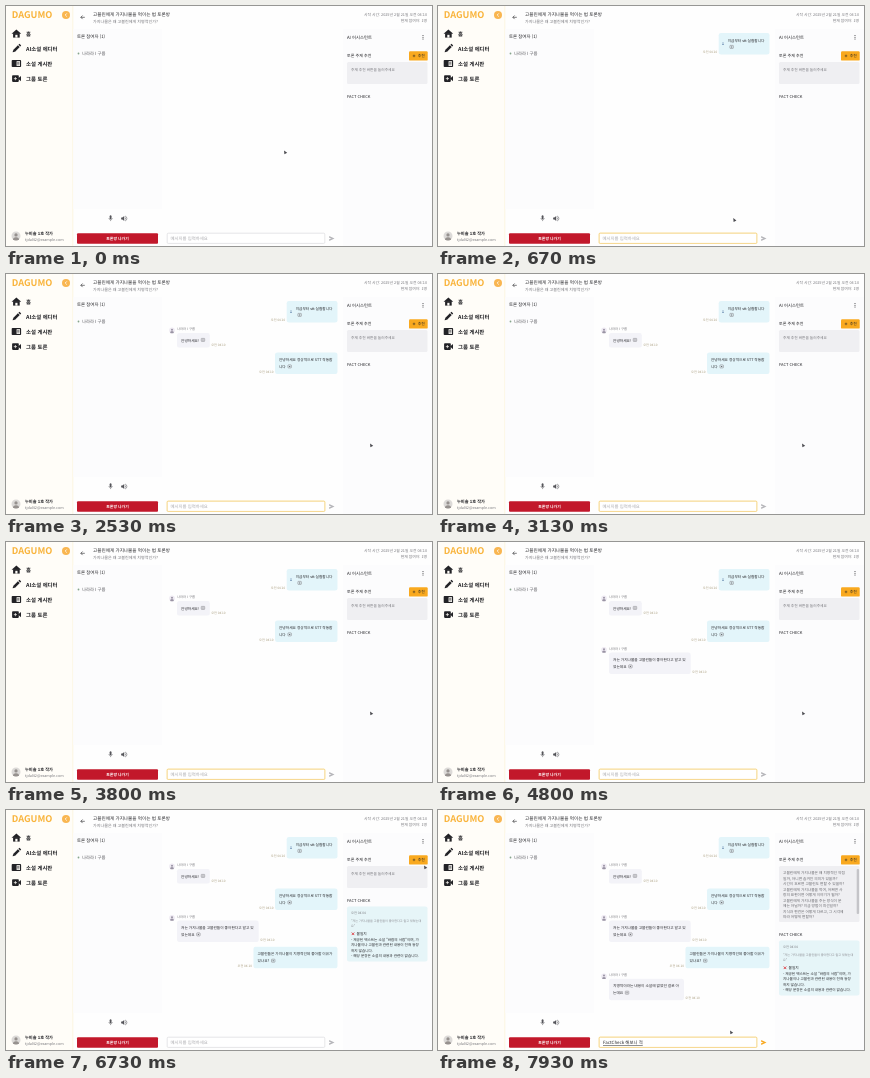
Write an HTML page with a canvas that moves like this. It is 426 px wide and 240 px high and loops after 8000 ms.

```html
<!DOCTYPE html>
<html lang="ko">
<head>
<meta charset="utf-8">
<title>토론방</title>
<style>
html, body { margin: 0; width: 100%; height: 100%; overflow: hidden; background: #fff; }
canvas { display: block; width: 100vw; height: 100vh; }
</style>
</head>
<body>
<canvas id="stage"></canvas>
<script>
const W = 426, H = 240, LOOP = 8000;
const FONT = '"Noto Sans CJK KR", "Noto Sans CJK", "Noto Sans", sans-serif';
const INK = '#222226', GREY = '#77777c', PALE = '#a9a9ad', ORANGE = '#f9a91f';
const SIDE = '#fffdf8', PANEL = '#fcfcfd';
const USER = '나라라 I 구름';
const canvas = document.getElementById('stage');
const ctx = canvas.getContext('2d');

function setFont(size, weight = 400) {
  ctx.font = `${weight} ${size}px ${FONT}`;
}

function text(str, x, y, size, color = INK, weight = 400, align = 'left') {
  setFont(size, weight);
  ctx.fillStyle = color;
  ctx.textAlign = align;
  ctx.fillText(str, x, y);
}

function lines(list, x, y, step, size, color) {
  list.forEach((str, i) => text(str, x, y + i * step, size, color));
}

function box(x, y, w, h, fill, r = 0, stroke) {
  ctx.beginPath();
  ctx.roundRect(x, y, w, h, r);
  if (fill) { ctx.fillStyle = fill; ctx.fill(); }
  if (stroke) { ctx.strokeStyle = stroke; ctx.lineWidth = 0.6; ctx.stroke(); }
}

function disc(x, y, r, fill) {
  ctx.beginPath();
  ctx.arc(x, y, r, 0, Math.PI * 2);
  ctx.fillStyle = fill;
  ctx.fill();
}

// Triangle with its tip at x, y, pointing along the angle
function wedge(x, y, length, half, angle, fill) {
  at(x, y, () => {
    ctx.rotate(angle);
    ctx.beginPath();
    ctx.moveTo(0, 0);
    ctx.lineTo(-length, half);
    ctx.lineTo(-length, -half);
    ctx.fillStyle = fill;
    ctx.fill();
  });
}

function at(x, y, paint) {
  ctx.save();
  ctx.translate(x, y);
  paint();
  ctx.restore();
}

function stroke(path, x, y, color, width) {
  at(x, y, () => {
    ctx.strokeStyle = color;
    ctx.lineWidth = width;
    ctx.stroke(new Path2D(path));
  });
}

function plus(x, y, r, color, width, turn = 0) {
  at(x, y, () => {
    ctx.rotate(turn);
    stroke(`M${-r} 0H${r}M0 ${-r}V${r}`, 0, 0, color, width);
  });
}

function person(x, y, r, back, front) {
  disc(x, y, r, back);
  ctx.save();
  ctx.clip();
  disc(x, y - r * 0.25, r * 0.36, front);
  disc(x, y + r * 0.95, r * 0.7, front);
  ctx.restore();
}

function home() {
  wedge(0, -4.2, 4.4, 4.8, -Math.PI / 2, INK);
  box(-3.3, -0.4, 6.6, 4.4, INK);
  box(-1.1, 1.2, 2.2, 2.8, SIDE);
}

function pencil() {
  ctx.rotate(-Math.PI / 4);
  box(-3.2, -1.3, 6.6, 2.6, INK);
  box(4.1, -1.3, 1.5, 2.6, INK, 0.4);
  wedge(-5.3, 0, 2.2, 1.3, Math.PI, INK);
}

function book() {
  box(-4.7, -3.5, 9.4, 7, INK, 0.8);
  box(0.2, -2.4, 3.4, 4.8, SIDE);
  for (let i = -1; i <= 1; i++) box(0.7, i * 1.3 - 0.25, 2.4, 0.5, INK);
}

function camera() {
  box(-4.3, -3.3, 6.7, 6.6, INK, 0.8);
  wedge(1.6, 0, 3, 2.7, Math.PI, INK);
  plus(-1, 0, 1.6, SIDE, 0.7);
}

const menu = [[home, '홈'], [pencil, 'AI소설 에디터'], [book, '소설 게시판'], [camera, '그룹 토론']];

function drawSidebar() {
  box(0, 0, 67, H, SIDE);
  box(66.6, 0, 0.6, H, '#fbf1cf');
  text('DAGUMO', 5.8, 12.3, 9.2, '#f9b43c', 900);
  disc(60, 9, 4, '#f9b651');
  stroke('M.8-1.6L-.8 0L.8 1.6', 60, 9, '#fff', 0.8);
  menu.forEach(([icon, label], i) => {
    at(10.4, 27.6 + i * 15, icon);
    text(label, 20, 29.6 + i * 15, 5.4, INK, 700);
  });
  person(10, 230, 4.5, '#dcdad8', '#96918e');
  text('누비솔 1호 작가', 19, 229, 4.2, INK, 700);
  text('tjdal42@example.com', 19, 235, 3.7, GREY);
}

function drawHeader() {
  stroke('M4 0H0M1.8-1.8L0 0L1.8 1.8', 74.8, 11.3, INK, 0.6);
  text('고블린에게 가지나물을 먹이는 법 토론방', 87, 10.2, 4.6, INK, 500);
  text('가지나물은 왜 고블린에게 치명적인가?', 87, 16.7, 4.05, GREY);
  text('시작 시간: 2025년 2월 21일 오전 04:10', 421, 10.2, 3.8, GREY, 400, 'right');
  text('현재 참여자: 1명', 421, 16.4, 3.8, GREY, 400, 'right');
}

function drawMembers() {
  box(67.2, 23, 89, 180, PANEL);
  text('토론 참여자 (1)', 71, 32.3, 4.4, INK, 500);
  disc(72.5, 47.5, 0.9, '#85a58b');
  text(USER, 76, 49.1, 4.3, '#55555a');

  const tone = '#55555a';
  box(103.7, 209.3, 1.8, 3.8, tone, 0.9);
  stroke('M-1.7-.6A1.7 1.7 0 0 0 1.7-.6M0 1.1V2.5', 104.6, 212.6, tone, 0.5);
  box(115.2, 211.5, 1.5, 2, tone);
  wedge(115.4, 212.5, 2.8, 2.6, Math.PI, tone);
  stroke('M0-1.3A1.5 1.5 0 0 1 0 1.3M.2-2.5A2.6 2.6 0 0 1 .2 2.5', 118.8, 212.5, tone, 0.5);

  box(71, 227.3, 81, 10.4, '#c2182b', 1);
  text('토론방 나가기', 111.5, 233.9, 3.9, '#fff', 700, 'center');
}

const messages = [
  { time: 600, mine: true, indent: 5, body: ['지금부터 stt 실험합니다', ''] },
  { time: 930, body: ['안녕하세요!'] },
  { time: 1930, mine: true, body: ['안녕하세요 정상적으로 STT 작동합', '니다'] },
  { time: 4600, body: ['저는 가지나물을 고블린들이 좋아한다고 알고 있', '었는데요'] },
  { time: 5270, mine: true, body: ['고블린들은 가지나물이 치명적인데 좋아할 이유가', '있나요?'] },
  { time: 7270, body: ['치명적이라는 내용이 소설에 없었던 걸로 아', '는데요'] }
];

// Bubbles fit their text and stack; returns the bottom edge
function drawMessage(top, { mine, body, indent = 0 }) {
  setFont(3.68);
  const widths = body.map(str => ctx.measureText(str).width);
  const tail = widths[widths.length - 1];
  const w = Math.max(...widths, tail + 5.7) + 9 + indent;
  const h = body.length * 6.8 + 7.8;
  const x = mine ? 331.5 - w : 171;
  const y = top + (mine ? 4.9 : 10.6);
  const left = x + 4 + indent, end = left + tail + 2.2;
  const iconY = y + body.length * 7 - 1.6;

  box(x, y, w, h, mine ? '#e3f5fa' : '#f3f3f8', 2.2);
  lines(body, left, y + 8.5, 7, 3.68);
  box(end, iconY, 3.4, 3, null, 0.4, '#88888e');
  box(end + 1.1, iconY + 1, 1.2, 1, '#66666b');
  if (indent) stroke('M0-1.5V1.5M-.9.6L0 1.5L.9.6', x + 4.3, y + 10.5, '#5276a0', 0.5);
  text('오전 04:10', mine ? x - 1.6 : x + w + 1.4, y + h - 1.3, 3.1, '#a59878', 400, mine ? 'right' : 'left');
  if (!mine) {
    person(166, y - 2.6, 2.8, '#eeeaf2', '#9a94a4');
    text(USER, 171, y - 2.7, 3.3, GREY);
  }
  return y + h;
}

const draft = 'FactCheck 해보니 적';

function drawInput(t) {
  const focus = t >= 400 && t < 6470 || t >= 7400;
  const typed = draft.slice(0, Math.max(0, Math.floor((t - 7450) / 32)));
  if (focus) box(160.5, 226.5, 159, 11.6, '#fff4d0', 1.6);
  box(161.2, 227.2, 157.6, 10.2, '#fff', 1, focus ? '#efc04f' : '#d5d5d8');
  if (typed) {
    text(typed, 165, 234, 4.4);
    box(165, 235, ctx.measureText(typed).width, 0.4, INK);
  } else {
    text('메시지를 입력하세요', 164.5, 234, 4.35, PALE);
  }
  wedge(328.5, 232.5, 5.3, 2.5, 0, typed ? ORANGE : '#b5b5b9');
  wedge(325.6, 232.5, 2.7, 0.7, 0, '#fefefe');
}

function drawPopup() {
  box(188, 192, 63, 32.5, '#1d1d20', 2);
  wedge(194, 226.8, 2.8, 2.5, Math.PI / 2, '#1d1d20');
  lines(['공식지정', '찾아주는 말이 높은 용어이다.', '조작다 (추천하는 액션이)'], 191.5, 199.6, 9.7, 3.7, '#e4e4e6');
}

const topics = ['고블린에게 가지나물은 왜 치명적인 약점', '일까, 아니면 숨겨진 의미가 있을까?',
  '시간이 흐르면 고블린도 변할 수 있을까?', '고블린에게 가지나물을 먹여, 어쩌면 사',
  '랑의 표현이면 어떻게 이야기가 될까?', '고블린에게 가지나물을 주는 방식이 문',
  '제는 아닐까? 지금 방법이 최선일까?', '지식과 편견은 어떻게 다르고, 그 시각에', '따라 어떻게 변할까?'];

const verdict = ['- 제공된 텍스트는 소설 "바람의 서랍"이며, 가', '지나물이나 고블린과 관련된 내용이 전혀 등장',
  '하지 않습니다.', '- 해당 문장은 소설의 내용과 관련이 없습니다.'];

function drawVerdict() {
  box(341, 96.5, 80.5, 55, '#e6f5f8', 1.8);
  text('오전 04:04', 345, 104, 3.2, GREY);
  lines(['"저는 가지나물을 고블린들이 좋아한다고 알고 있었는데', '요"'], 345, 111.8, 5.2, 3.05, '#8a8a90');
  plus(347, 123.8, 1.8, '#dc2f35', 0.8, Math.PI / 4);
  text('불일치', 350.5, 125.2, 3.7, INK, 500);
  lines(verdict, 345, 130.8, 5.5, 3.6);
}

function drawAssistant(t) {
  const open = t >= 7000;
  box(337, 23, 89, 217, PANEL);
  text('AI 어시스턴트', 341, 32.8, 4.3, INK, 500);
  for (let i = -1; i <= 1; i++) disc(417, 31.2 + i * 1.7, 0.5, INK);
  text('토론 주제 추천', 341, 51.2, 4, INK, 500);
  box(403, 45.2, 18.7, 9.4, ORANGE, 1.2);
  plus(408, 49.9, 1.3, INK, 0.5);
  text('추천', 411.7, 51.3, 3.8, INK, 500);

  box(341, 56, 80.5, open ? 56 : 22, '#efeff2', 1.5);
  if (open) {
    lines(topics, 345, 64, 5.55, 3.7, '#66666b');
    box(418.7, 59, 2.4, 45, '#c4c4c8', 1);
  } else {
    text('주제 추천 버튼을 눌러주세요', 345, 65, 3.7, GREY);
  }

  at(0, open ? 34 : 0, () => {
    text('FACT CHECK', 341, 92, 4, INK, 500);
    if (t >= 6270) drawVerdict();
  });
}

// Each move: start time, destination
const moves = [[130, 270, 230], [550, 365, 171], [6330, 419, 57], [6930, 293, 222]];

function drawPointer(t) {
  let x = 279, y = 146;
  for (const [begin, toX, toY] of moves) {
    const k = Math.min(1, Math.max(0, (t - begin) / 350));
    const e = k * k * (3 - 2 * k);
    x += (toX - x) * e;
    y += (toY - y) * e;
  }
  wedge(x - 1, y - 1.6, 3.6, 1.6, -2.1, '#4a4a4f');
}

function draw(t) {
  const dpr = window.devicePixelRatio || 1;
  const w = Math.round(innerWidth * dpr), h = Math.round(innerHeight * dpr);
  if (canvas.width !== w || canvas.height !== h) {
    canvas.width = w;
    canvas.height = h;
  }
  ctx.setTransform(w / W, 0, 0, h / H, 0, 0);
  ctx.textRendering = 'geometricPrecision';
  box(0, 0, W, H, '#fefefe');
  drawSidebar();
  drawHeader();
  drawMembers();
  messages.filter(m => t >= m.time).reduce(drawMessage, 22.1);
  drawInput(t);
  if (t >= 1130 && t < 1600) drawPopup();
  drawAssistant(t);
  drawPointer(t);
}

const start = performance.now();
function tick() {
  draw((performance.now() - start) % LOOP);
  requestAnimationFrame(tick);
}
tick();
</script>
</body>
</html>
```
